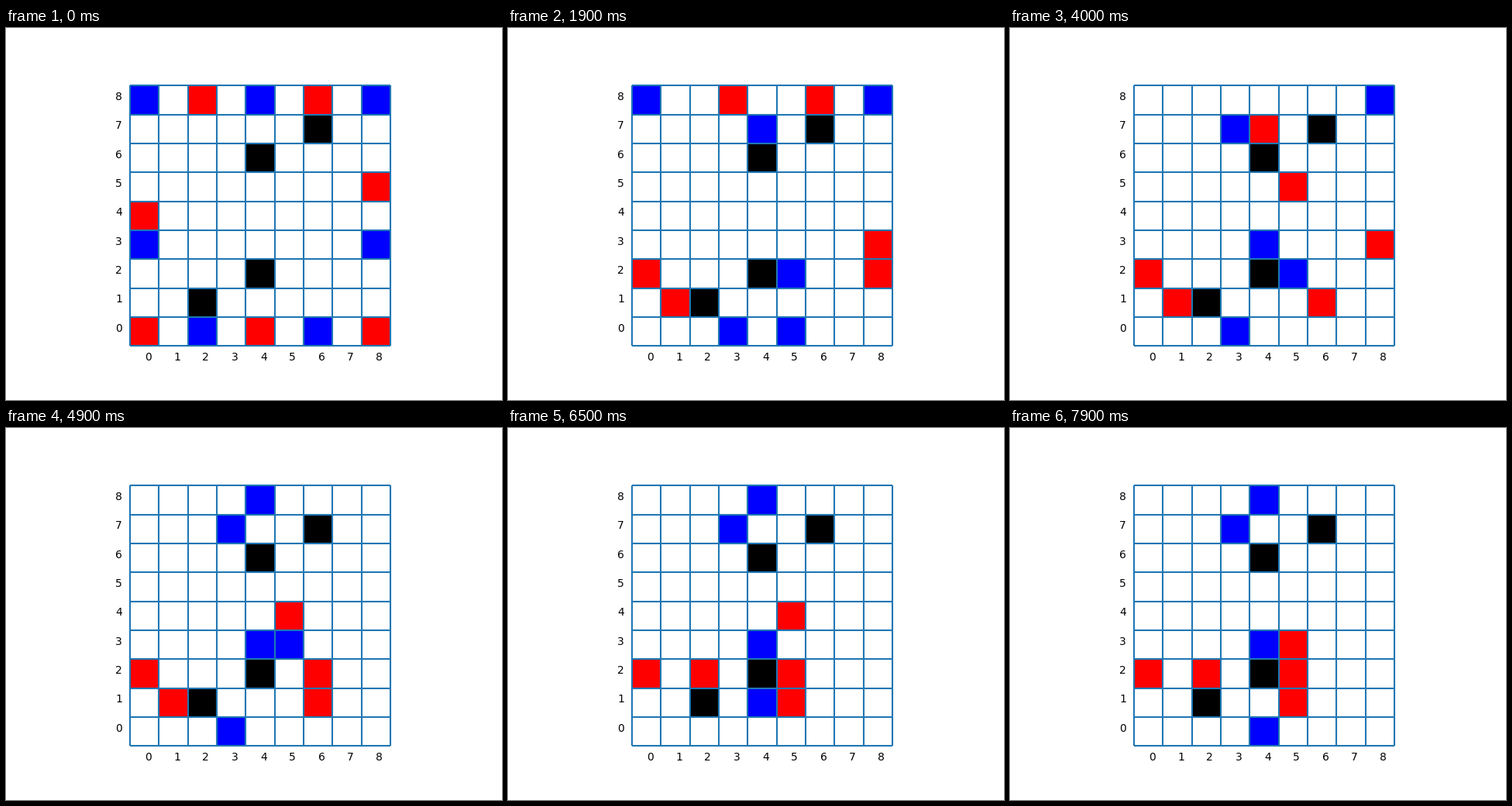
A matplotlib script that plays this animation: 640x480 px, repeating every 8 s.

```python
from itertools import chain, cycle

import matplotlib.pyplot as plt
from matplotlib.animation import FuncAnimation
from matplotlib.patches import Rectangle

SIZE = 9
FRAMES = 80
SIDES = ((1, 0), (-1, 0), (0, 1), (0, -1))

START = {
    "black": "21 42 46 67",
    "blue": "08 48 88 03 83 20 60",
    "red": "28 68 85 04 00 40 80",
}

# Trips between two cells (column, row); the last list repeats for ever.
TRIPS = {
    "blue": ("20-30 60-50 83-73 03-12 73-72 12-11 48-47 72-53 08-16 16-37 "
             "50-51 53-43 51-53 88-48 30-41 37-28 28-37", "41-40 40-41"),
    "red": ("85-84 80-82 04-02 84-83 00-01 01-11 28-48 48-47 68-48 47-55 "
            "48-47 82-61 55-54 83-72 72-52 54-53 61-51 11-12 12-22",
            "53-54 54-53"),
}


def cell(name):
    return int(name[0]), int(name[1])


def walk(trips):
    """Yield one-cell moves, sideways first and then up or down."""
    for trip in trips:
        (x, y), (tx, ty) = map(cell, trip.split("-"))
        while (x, y) != (tx, ty):
            old = x, y
            if x != tx:
                x += 1 if tx > x else -1
            else:
                y += 1 if ty > y else -1
            yield old, (x, y)


def play(board, old, new):
    """Move a piece and remove enemies caught against a friend or wall."""
    board = dict(board)
    side = board[new] = board.pop(old)
    enemy = "red" if side == "blue" else "blue"
    x, y = new
    for dx, dy in SIDES:
        near, far = (x + dx, y + dy), (x + 2 * dx, y + 2 * dy)
        if board.get(near) == enemy and board.get(far) in (side, "black"):
            del board[near]
    return board


def plan(side):
    opening, shuttle = TRIPS[side]
    return walk(chain(opening.split(), cycle(shuttle.split())))


boards = [{cell(n): color for color, names in START.items()
           for n in names.split()}]
turns = cycle([plan("blue"), plan("red")])
while len(boards) < FRAMES:
    boards.append(play(boards[-1], *next(next(turns))))

fig, ax = plt.subplots(figsize=(6.4, 4.8), dpi=100)
ax.set_aspect("equal")
ax.axis("off")
ax.vlines(range(SIZE + 1), 0, SIZE)
ax.hlines(range(SIZE + 1), 0, SIZE)
for i in range(SIZE):
    ax.text(i + 0.5, -0.5, str(i))
    ax.text(-0.5, i + 0.5, str(i))

tiles = {(x, y): ax.add_patch(Rectangle((x, y), 1, 1, fc="white", lw=0))
         for x in range(SIZE) for y in range(SIZE)}


def draw(frame):
    for pos, tile in tiles.items():
        tile.set_facecolor(boards[frame].get(pos, "white"))
    return list(tiles.values())


anim = FuncAnimation(fig, draw, frames=FRAMES, interval=100, repeat=True,
                     repeat_delay=0, blit=False)
plt.show()
```
